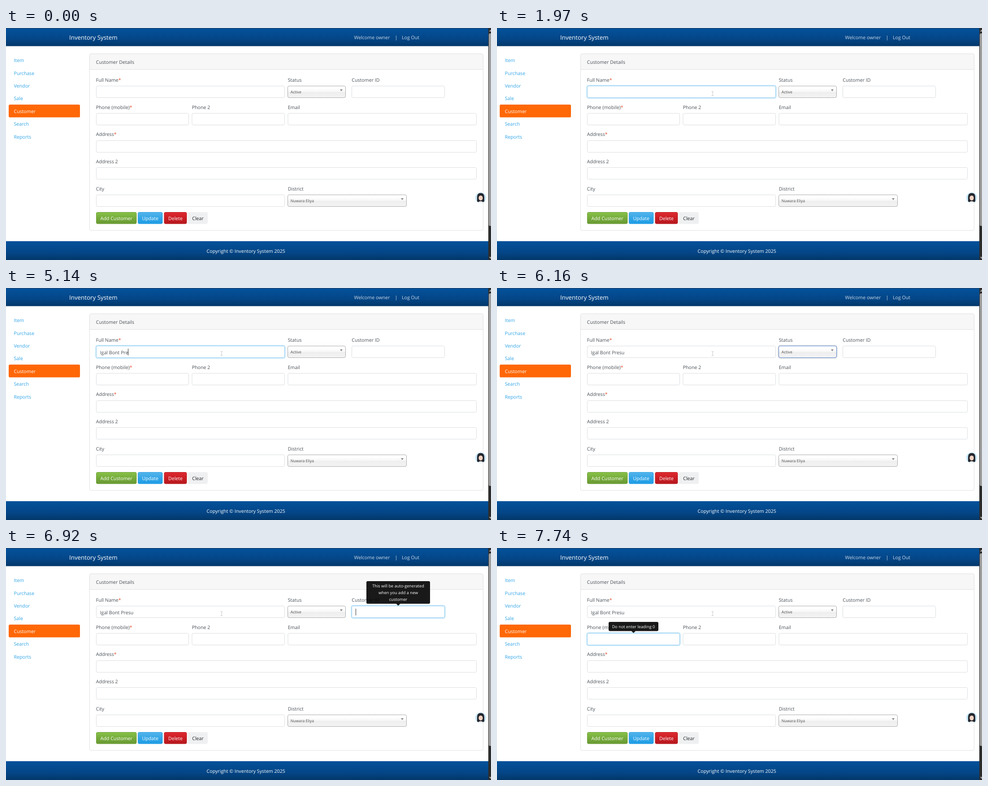
An HTML page that plays this animation: 1082 px wide and 518 px high, repeating every 8000 ms.

```html
<!DOCTYPE html>
<html lang="en">
<head>
<meta charset="utf-8">
<title>Inventory System</title>
<style>
  html, body { margin: 0; width: 100%; height: 100%; overflow: hidden; background: #fff; }
  svg { display: block; width: 100vw; height: 100vh; }
  text { font: 10.65px "Open Sans", "Noto Sans", sans-serif; fill: #495057; text-rendering: geometricPrecision; white-space: pre; }
  .brand { font-size: 13.35px; fill: #fff; }
  .light { fill: #fff; }
  .nav { fill: #cddbe9; }
  .link { fill: #2fa4e7; }
  .dark { fill: #212529; }
  .small { font-size: 8.7px; fill: #4c4c4c; }
  .tip text { font-size: 9.2px; fill: #fff; }
  .star { fill: #e4502a; }
  .mid { text-anchor: middle; }
</style>
</head>
<body>
<svg id="stage" viewBox="0 0 1082 518" xmlns="http://www.w3.org/2000/svg">
  <defs id="defs"></defs>
  <g id="page"></g>
  <g id="tips"></g>
  <rect id="caret" width="1" height="15" fill="#2b3036"/>
  <path id="arrow" d="M0 0V9.6L2.3 7.5L3.9 11L5.4 10.3L3.9 7H7Z" fill="#fff" stroke="#222" stroke-width=".8"/>
  <path id="beam" d="M-2.3 -4.5H-.6L0 -4L.6 -4.5H2.3M0 -4V4.2M-2.3 4.7H-.6L0 4.2L.6 4.7H2.3" fill="none" stroke-width=".9"/>
</svg>
<script>
const LOOP = 8000;
const $ = id => document.getElementById(id);

const gradient = (id, stops) =>
  `<linearGradient id="${id}" x2="0" y2="1">${stops.map(([at, c]) =>
    `<stop offset="${at}" stop-color="${c}"/>`).join("")}</linearGradient>`;
const rect = (x, y, w, h, fill, rest = "") =>
  `<rect x="${x}" y="${y}" width="${w}" height="${h}" fill="${fill}" ${rest}/>`;
const text = (x, y, str, cls = "") => `<text x="${x}" y="${y}" class="${cls}">${str}</text>`;

$("defs").innerHTML =
  gradient("bar", [[0, "#04519b"], [.6, "#044687"], [1, "#033769"]]) +
  gradient("green", [[0, "#88c149"], [.6, "#73a839"], [1, "#699934"]]) +
  gradient("blue", [[0, "#54b4eb"], [.6, "#2fa4e7"], [1, "#1d9ce5"]]) +
  gradient("red", [[0, "#dd2a30"], [.6, "#c71c22"], [1, "#b5191f"]]) +
  gradient("select", [[.2, "#fff"], [.5, "#f6f6f6"], [.52, "#eee"], [1, "#f4f4f4"]]) +
  `<filter id="soft" x="-10%" y="-30%" width="120%" height="160%"><feGaussianBlur stdDeviation="1.2"/></filter>`;

const rowTop = r => Math.round(129 + 60.8 * r) + .5;
const label = (x, r, str, star) =>
  text(x, 119.8 + 60.8 * r, str + (star ? '<tspan class="star">*</tspan>' : ""));

function field(x, r, w, id) {
  const y = rowTop(r);
  const glow = id ? rect(x - 1, y - 1, w + 2, 28, "none",
    `id="${id}Glow" rx="4" stroke="#2fa4e7" stroke-opacity=".28" stroke-width="2.4"`) : "";
  return glow + rect(x, y, w, 26, "#fff", `rx="2.8" stroke="#dadde0" ${id ? `id="${id}"` : ""}`);
}

function select(x, r, w, str, id) {
  const y = rowTop(r), a = x + w - 12.5;
  const shade = id ? rect(x, y, w, 26, "none",
    `id="${id}Glow" rx="3.5" stroke="#000" stroke-opacity=".35" stroke-width="2" filter="url(#soft)"`) : "";
  return shade + rect(x, y, w, 26, "url(#select)", `rx="3.5" stroke="#aaa" ${id ? `id="${id}"` : ""}`) +
    text(x + 6.2, y + 16, str, "small") +
    `<path d="M${a} ${y + 7.5}h6l-3 4.2z" fill="#888"/>`;
}

const button = (x, w, fill, edge, str, cls) =>
  rect(x + .5, 411.5, w - 1, 25.5, fill, `rx="2.8" stroke="${edge}"`) +
  text(x + w / 2, 429, str, "mid " + cls);

function page() {
  const items = ["Item", "Purchase", "Vendor", "Sale", "Customer", "Search", "Reports"];
  return [
    rect(0, 0, 1082, 518, "#fff"),
    rect(0, 0, 1076, 40.5, "url(#bar)"),
    rect(0, 0, 1082, 1, "#24425f"),
    text(141, 26, "Inventory System", "brand"),
    text(776.5, 25, "Welcome owner", "nav"),
    text(867.6, 25, "|", "nav"),
    text(883, 25, "Log Out", "nav"),

    rect(6, 171, 159, 28.5, "#ff6707", 'rx="2.8"'),
    ...items.map((s, i) => text(17.5, 76.2 + 28.4 * i, s, i === 4 ? "light" : "link")),

    rect(186.5, 57.5, 878, 394.5, "#fff", 'rx="3"'),
    `<path d="M187 92V61q0-3 3-3h871q3 0 3 3v31z" fill="#f7f7f7"/>`,
    rect(187, 92, 877, 1, "#dfdfdf"),
    rect(186.5, 57.5, 878, 394.5, "none", 'rx="3" stroke="#dfdfdf"'),
    text(200.7, 79.7, "Customer Details"),

    label(200.7, 0, "Full Name", true), field(201.5, 0, 420, "name"),
    label(628.7, 0, "Status"), select(628.5, 0, 129, "Active", "status"),
    label(771.3, 0, "Customer ID"), field(771.5, 0, 207, "code"),
    label(200.7, 1, "Phone (mobile)", true), field(201.5, 1, 206, "phone"),
    label(414.7, 1, "Phone 2"), field(415, 1, 206.5),
    label(628.7, 1, "Email"), field(629, 1, 420.5),
    label(200.7, 2, "Address", true), field(201.5, 2, 848),
    label(200.7, 3, "Address 2"), field(201.5, 3, 848),
    label(200.7, 4, "City"), field(201.5, 4, 420),
    label(628.7, 4, "District"), select(628.5, 4, 265, "Nuwara Eliya"),
    `<text id="typed" x="209.6" y="147.6"></text>`,

    button(201, 90.5, "url(#green)", "#6d9f36", "Add Customer", "light"),
    button(294, 55.5, "url(#blue)", "#2b9fe2", "Update", "light"),
    button(352.5, 51, "url(#red)", "#b91a20", "Delete", "light"),
    button(406, 44, "#eff0f1", "#eff0f1", "Clear", "dark"),

    rect(0, 476, 1076, 42, "url(#bar)"),
    text(535.2, 502, "Copyright © Inventory System 2025", "mid light"),

    // assistant bubble with a plain silhouette
    `<circle cx="1059" cy="379" r="12" fill="#c3e6f8"/>`,
    `<path d="M1051 387.5V377q0-8.5 8-8.5t8 8.5v10.5q-8 4-16 0z" fill="#25262d"/>`,
    `<ellipse cx="1059" cy="379.5" rx="4.6" ry="5.6" fill="#f3d3c3"/>`,
    `<path d="M1053.5 389q5.5-4.5 11 0q-5.5 3-11 0z" fill="#f4f4f6"/>`,

    rect(1076, 0, 6, 518, "#2c2c2c"),
    rect(1077, 12, 7, 430, "#9f9f9f", 'rx="3"'),
    `<path d="M1077.5 8l3.5-4.5l3.5 4.5zM1077.5 511h7l-3.5 4.5z" fill="#9f9f9f"/>`
  ].join("");
}

function tip(id, cx, y, w, h, lines) {
  const b = y + h;
  return `<g id="${id}" class="tip">
    <path d="M${cx - w / 2 + 3} ${y}h${w - 6}q3 0 3 3v${h - 6}q0 3 -3 3H${cx + 4.5}l-4.5 4.3l-4.5 -4.3H${cx - w / 2 + 3}q-3 0 -3 -3V${y + 3}q0 -3 3 -3z" fill="#000" fill-opacity=".9"/>
    ${lines.map((s, i) => text(cx, y + 14.2 + 15 * i, s, "mid")).join("")}</g>`;
}

$("page").innerHTML = page();
$("tips").innerHTML =
  tip("codeTip", 875, 74, 142, 50.5, ["This will be auto-generated", "when you add a new", "customer"]) +
  tip("phoneTip", 304.5, 165, 111, 20.5, ["Do not enter leading 0"]);

const NAME = "Igal Bont Presu";
// [time, letters typed]
const KEYS = [[2590, 1], [2660, 2], [2800, 3], [2940, 4], [3350, 5], [3770, 6], [3910, 7], [3970, 8],
  [4110, 9], [4180, 10], [4940, 11], [5000, 12], [5140, 13], [5270, 15]];
// [time, x, y, is text beam]
const MOVES = [[260, 817, 391, 0], [330, 694, 302, 0], [400, 601.5, 236.5, 0], [670, 589, 226, 0],
  [740, 560, 205, 1], [810, 525, 181, 0], [880, 494, 162, 0], [950, 474, 152, 1], [1020, 466, 148, 1],
  [1090, 472, 147, 1], [1160, 481, 146.3, 1]];
// [shown from, hidden at, field]
const CARET = [[1440, 1970, "name"], [2520, 4720, "name"], [4940, 5820, "name"],
  [6780, 7190, "code"], [7190, 7740, "phone"]];
const FOCUS = { name: [1440, 6020], status: [6020, 6780], code: [6780, 7190], phone: [7190, LOOP] };

const last = (rows, t) => rows.filter(r => r[0] <= t).pop();
const ramp = (t, start) => t < start ? 0 : Math.min(1, (Math.floor((t - start) / 70) + 1) / 3);
const mix = (a, b, k) => `rgb(${a.map((v, i) => Math.round(v + (b[i] - v) * k))})`;

function draw(t) {
  const key = last(KEYS, t);
  const typed = $("typed");
  const str = key ? NAME.slice(0, key[1]) : "";
  if (typed.textContent !== str) typed.textContent = str;

  for (const [id, [on, off]] of Object.entries(FOCUS)) {
    const level = ramp(t, on) - ramp(t, off);
    const now = id === "status" ? +(t >= on && t < off) : level;
    const [rest, lit] = id === "status" ? [[170, 170, 170], [98, 142, 216]] : [[218, 221, 224], [151, 209, 243]];
    $(id).setAttribute("stroke", mix(rest, lit, now));
    $(id + "Glow").setAttribute("opacity", now);
    const hint = $(id + "Tip");
    if (hint) hint.setAttribute("opacity", level);
  }

  const blink = CARET.find(([on, off]) => t >= on && t < off);
  const caret = $("caret");
  caret.setAttribute("visibility", blink ? "visible" : "hidden");
  if (blink) {
    const width = str ? typed.getComputedTextLength() : 0;
    const x = { name: 210 + Math.max(0, Math.round(width - .6)), code: 780, phone: 210 }[blink[2]];
    caret.setAttribute("x", x);
    caret.setAttribute("y", blink[2] === "phone" ? 196.5 : 135.5);
  }

  const move = last(MOVES, t);
  for (const [id, kind] of [["arrow", 0], ["beam", 1]]) {
    const shown = move && move[3] === kind;
    $(id).setAttribute("visibility", shown ? "visible" : "hidden");
    if (shown) $(id).setAttribute("transform", `translate(${move[1]} ${move[2]})`);
  }
  $("beam").setAttribute("stroke", t < 1440 ? "#222" : "#bcbcbc");
}

const start = performance.now();
function frame() {
  draw((performance.now() - start) % LOOP);
  requestAnimationFrame(frame);
}
frame();
</script>
</body>
</html>
```
